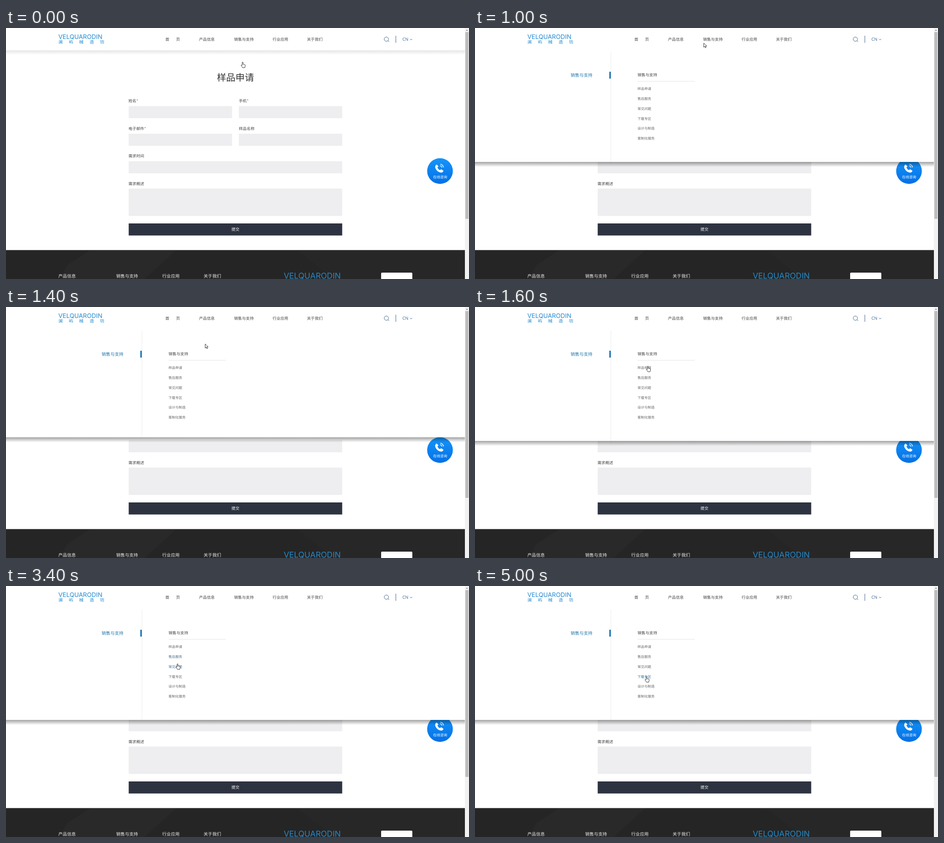
An HTML page for the animation above (5600 ms loop, 1017 px wide and 551 px high).

```html
<!DOCTYPE html>
<html lang="zh-CN">
<head>
<meta charset="utf-8">
<style>
  html, body { margin: 0; width: 100%; height: 100%; overflow: hidden; background: #fff; }
  svg { display: block; font-family: 'Noto Sans CJK SC', 'Noto Sans CJK JP', sans-serif; text-rendering: geometricPrecision; }
</style>
</head>
<body>
<svg id="stage" width="1017" height="551" viewBox="0 0 1017 551"></svg>
<script>
const LOOP = 5600, STEP = 200, MENU_TOP = 49;
const stage = document.getElementById('stage');

// y is the vertical middle of the characters
const text = (x, y, size, str, fill, attrs = '') =>
  `<text x="${x}" y="${y + size * 0.38}" font-size="${size}" fill="${fill}" ${attrs}>${str}</text>`;
const rect = (x, y, w, h, fill, attrs = '') =>
  `<rect x="${x}" y="${y}" width="${w}" height="${h}" fill="${fill}" ${attrs}/>`;
const field = (x, y, w, h) => rect(x, y, w, h, '#eeeef0', 'rx="1.5"');
const required = name => `${name}<tspan fill="#a8645c">*</tspan>`;
const brand = (x, baseline, size, fill) =>
  `<text x="${x}" y="${baseline}" font-size="${size}" fill="${fill}" font-family="Inter, sans-serif">VELQUARODIN</text>`;

const nav = [[350, '首'], [373.5, '页'], [424, '产品信息'], [501, '销售与支持'], [585.5, '行业应用'], [661, '关于我们']];
const footer = [[115, '产品信息'], [242, '销售与支持'], [343, '行业应用'], [434, '关于我们']];
const items = ['样品申请', '售后服务', '常见问题', '下载专区', '设计与制造', '客制化服务'];

const form = [
  text(504, 108, 20.4, '样品申请', '#333', 'text-anchor="middle"'),
  text(269, 160, 8.6, required('姓名'), '#444'), field(269.5, 171.5, 227, 26.5),
  text(511.5, 160, 8.6, required('手机'), '#444'), field(511.5, 171.5, 227, 26.5),
  text(269, 220.5, 8.6, required('电子邮件'), '#444'), field(269.5, 232, 227, 26.5),
  text(511.5, 220.5, 8.6, '样品名称', '#444'), field(511.5, 232, 227, 26.5),
  text(269, 281, 8.6, '需求时间', '#444'), field(269.5, 292.5, 469, 26.5),
  text(269, 341.5, 8.6, '需求概述', '#444'), field(269.5, 352.5, 469, 60),
  rect(269.5, 429, 469, 26.5, '#2d3340'),
  text(504, 442, 8.7, '提交', '#fff', 'text-anchor="middle"'),
].join('');

const pageFooter = rect(0, 487.5, 1008, 64, '#252525') +
  '<path d="M118 551l16-30 50-33h190l-70 63z" fill="#2a2929"/><path d="M640 488h368v63H720z" fill="#282727"/>' +
  footer.map(([x, s]) => text(x, 544, 9.6, s, '#eee')).join('') +
  brand(610, 549.5, 17.5, '#2589c8') + rect(824, 537, 68.5, 30, '#fff', 'rx="2"');

const callButton = `<circle cx="953.3" cy="314" r="28.2" fill="url(#blue)"/>
  <path d="M946 299.500q-5 3-2.500 9q4 8 12 9q4 0 5.500-4l-5-3.500-3 2q-4-2-5.500-6l2.500-2z" fill="#fff"/>
  <path d="M953.500 302.500a4 4 0 0 1 4 4M954 299a7.500 7.500 0 0 1 7 7" fill="none" stroke="#fff" stroke-width="1.500"/>` +
  text(953.5, 327.5, 7.8, '在线咨询', '#fff', 'text-anchor="middle"');

const menu = `<g clip-path="url(#reveal)">` + rect(0, MENU_TOP, 1008, 246, '#fff') +
  rect(298, 52, 1, 243, '#eee') + rect(295, 96, 3.3, 15, '#1b76b5') +
  text(210, 103, 9.6, '销售与支持', '#2678ae') + text(357, 102.5, 8.6, '销售与支持', '#444') +
  rect(357, 116.5, 126, 1, '#e4e4e4') +
  items.map((s, i) => text(357, 133.5 + 21.75 * i, 7.5, s, '#666', 'class="item"')).join('') +
  `</g>` + rect(0, 0, 1008, 11, 'url(#shade)', 'id="menuShade" opacity=".36"');

const header = rect(0, 0, 1008, MENU_TOP, '#fff') + brand(115, 24, 13.5, '#2089d0') +
  text(115, 30.5, 9.5, '澜屿械造坊', '#2089d0', 'letter-spacing="13.4"') +
  nav.map(([x, s]) => text(x, 24.5, 8.6, s, '#444')).join('') +
  `<g fill="none" stroke="#3b6287"><circle cx="835.500" cy="24.500" r="4.700"/><path d="M839 28l2.500 2.300M887.500 24l2.300 2.200 2.300-2.200M856.300 17v15.500"/></g>` +
  `<text x="870.800" y="28" font-size="9.500" fill="#3b6894" font-family="Open Sans, sans-serif">CN</text>`;

const scrollbar = rect(1008, 0, 9, 551, '#f1f1f1') + rect(1009, 9, 7, 410, '#bdbdbd') +
  '<path d="M1010.500 6l2-2.500 2 2.500z" fill="#777"/>';

const pointers = `<g fill="#fff" stroke="#222" stroke-width=".9" stroke-linejoin="round">
  <path id="hand" d="M-2.200 1V-5.200a1 1 0 0 1 2 0v3.700l3.600.8q1.200.3 1.200 1.600c0 2-.8 3-1 5.200h-5c-.6-1.800-2-2.800-3-4.400q-.6-1.200.6-1.400z"/>
  <path id="arrow" d="M-2.500-5v9.200l2.200-2 1.500 3.400 1.500-.7-1.500-3.200h2.900z"/></g>`;

stage.innerHTML = `<defs>
  <linearGradient id="blue" x2="0" y2="1"><stop stop-color="#1595fa"/><stop offset="1" stop-color="#0470e6"/></linearGradient>
  <linearGradient id="shade" x2="0" y2="1"><stop/><stop offset="1" stop-opacity="0"/></linearGradient>
  <clipPath id="reveal"><rect id="window" y="${MENU_TOP}" width="1008"/></clipPath></defs>` +
  form + pageFooter + rect(0, MENU_TOP, 1008, 10, 'url(#shade)', 'opacity=".1"') +
  callButton + menu + header + scrollbar + pointers;

const $ = id => document.getElementById(id);
const itemNodes = [...document.querySelectorAll('.item')];

// [start, x, y]
const cursorPath = [
  [0, 521, 81], [200, 518, 42], [400, 517, 39], [1000, 505, 38], [1200, 482, 55], [1400, 440, 86],
  [1600, 381, 136], [1800, 376, 145], [2400, 376, 156], [2600, 377.5, 162], [3200, 378, 173.5],
  [3400, 378, 177], [4200, 379, 184.5], [4400, 378, 198.5], [4600, 378, 205],
];
// [start, bottom edge]
const menuPath = [[0, MENU_TOP], [200, 240], [400, 291], [600, 294], [1200, 266], [1400, 286], [1600, 294]];
// [pointer enters, pointer leaves] for each hovered item
const hovers = [[1600, 2400], [2400, 3200], [3200, 4400], [4400, LOOP]];

const latest = (list, t) => list.findLast(entry => entry[0] <= t);
const ramp = ms => Math.min(1, Math.max(0, ms / 300));

function draw(now) {
  const t = Math.floor(now % LOOP / STEP) * STEP;
  const [, x, y] = latest(cursorPath, t), [, bottom] = latest(menuPath, t);
  const isArrow = t >= 1000 && t < 1600;
  for (const id of ['hand', 'arrow']) {
    $(id).setAttribute('transform', `translate(${x} ${y})`);
    $(id).style.display = isArrow === (id === 'arrow') ? '' : 'none';
  }
  $('window').setAttribute('height', bottom - MENU_TOP);
  $('menuShade').setAttribute('y', bottom);
  $('menuShade').style.display = bottom > MENU_TOP ? '' : 'none';
  hovers.forEach(([enter, leave], i) => {
    const amount = ramp(t - enter) - ramp(t - leave);
    itemNodes[i].style.fill = `color-mix(in srgb, #2273ac ${amount * 100}%, #666)`;
  });
  requestAnimationFrame(draw);
}
requestAnimationFrame(draw);
</script>
</body>
</html>
```
